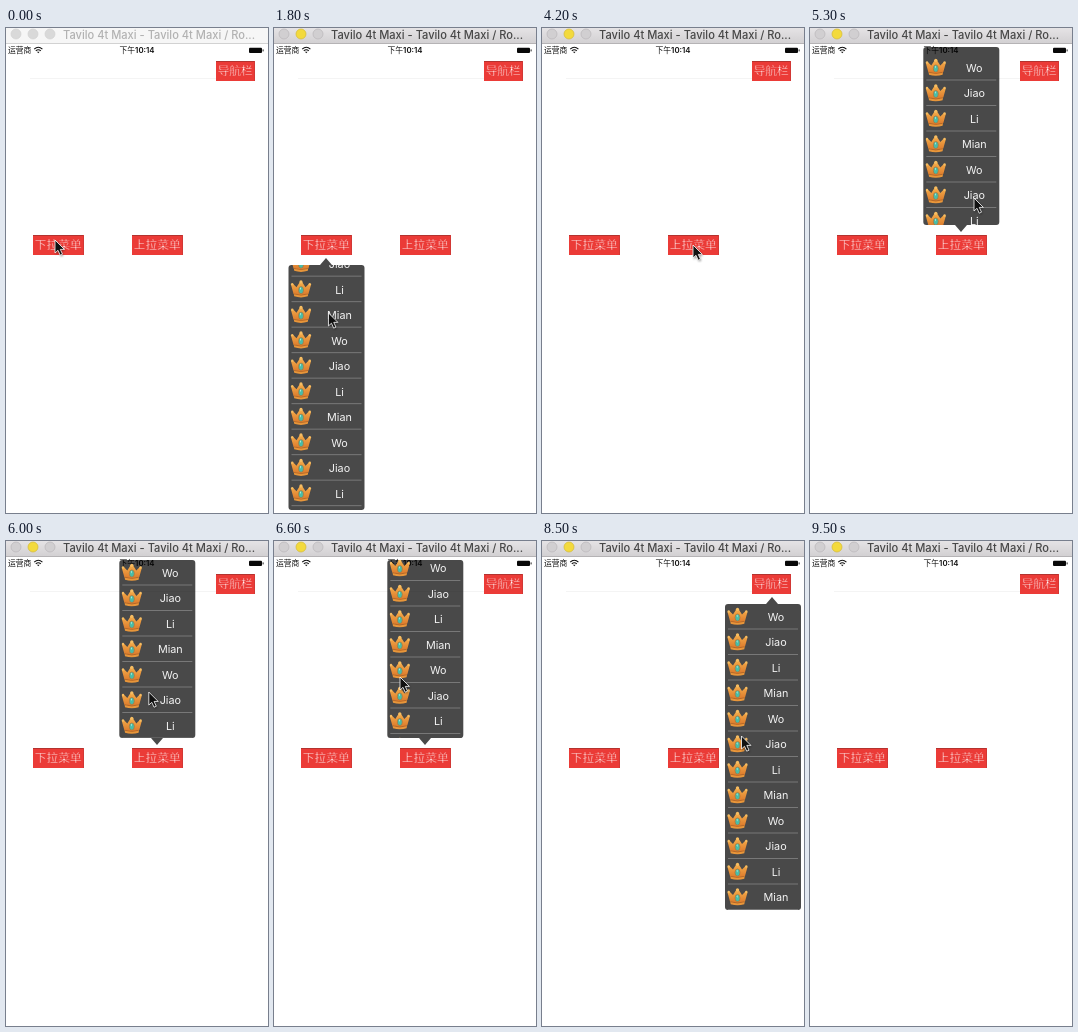
Recreate the animation shown at these times as an HTML page. Size 262 px wide and 485 px high, loop 10 s.

```html
<!DOCTYPE html>
<html lang="zh">
<head>
<meta charset="utf-8">
<title>弹出菜单</title>
<style>
html, body { margin: 0; width: 100%; height: 100%; overflow: hidden; background: #fff; }
svg { display: block; width: 262px; height: 485px; }
text { font-family: "Noto Sans CJK SC", "Noto Sans CJK", sans-serif; }
.latin { font-family: Inter, Roboto, sans-serif; }
/* The red stroke thins the glyphs to a light weight. */
.button { font-size: 11.7px; font-weight: 300; fill: #fff; stroke: #eb3b37; stroke-width: .35px; text-anchor: middle; }
.status { font-size: 7.8px; fill: #111; }
.row { font-size: 10.8px; fill: #f4f4f4; text-anchor: middle; }
</style>
</head>
<body>
<svg id="stage" viewBox="0 0 262 485" xmlns="http://www.w3.org/2000/svg">
  <defs>
    <linearGradient id="bar" x2="0" y2="1">
      <stop stop-color="#e5e3e5"/><stop offset="1" stop-color="#d2d0d2"/>
    </linearGradient>
    <linearGradient id="gold" x2="0" y2="1">
      <stop stop-color="#f5b04c"/><stop offset="1" stop-color="#dc7a2c"/>
    </linearGradient>
    <g id="crown">
      <path d="M0 4.5L2 3.5L5.5 7L9 1.5H11L14.5 7L18 3.5L20 4.5L17.5 13.5Q10 16 2.5 13.5Z" fill="url(#gold)"/>
      <path d="M2.7 13.2Q10 15.6 17.3 13.2L16.8 16.2Q10 18.4 3.2 16.2Z" fill="#e8963a"/>
      <path d="M3 13.8Q10 16.2 17 13.8" fill="none" stroke="#a85a20" stroke-width=".7"/>
      <g fill="#f6bd62"><circle cx="1.2" cy="4" r="1.2"/><circle cx="10" cy="1.8" r="1.6"/><circle cx="18.8" cy="4" r="1.2"/></g>
      <ellipse cx="10" cy="10" rx="2.5" ry="3.6" fill="#48bda9" stroke="#b9682a" stroke-width=".6"/>
      <path d="M9 8.2L10 7.2V10Z" fill="#c5f2e6"/>
    </g>
    <path id="arrow" d="M0 0V13L3 10.3L5.2 15.2L7.5 14.2L5.3 9.4H9.4Z"/>
    <filter id="blur"><feGaussianBlur stdDeviation=".9"/></filter>
    <g id="rows"></g>
  </defs>

  <rect width="262" height="485" fill="#fff"/>
  <rect id="titleBar" width="262" height="15.5"/>
  <path id="barEdge" d="M0 15.5H262"/>
  <g id="dots" stroke-width=".7"></g>
  <text id="title" class="latin" x="57" y="10.7" font-size="11.1" font-weight="500">Tavilo 4t Maxi - Tavilo 4t Maxi / Ro...</text>

  <text class="status" x="2" y="25">运营商</text>
  <g fill="none" stroke="#111" stroke-width="1.1">
    <path d="M28.2 21.1Q32.3 17.4 36.4 21.1M29.8 22.9Q32.3 20.7 34.8 22.9"/>
    <path d="M31 23.8H33.6L32.3 25.2Z" fill="#111" stroke="none"/>
  </g>
  <text class="status" x="131" y="25" text-anchor="middle">下午<tspan class="latin" font-weight="600">10:14</tspan></text>
  <rect x="243" y="19.8" width="13" height="5.2" rx="1" fill="#080808"/>
  <rect x="256.6" y="21.4" width="1" height="2" fill="#222"/>
  <path d="M24 50.5H210" stroke="#f4f4f4"/>
  <g id="buttons"></g>
  <g id="menus"></g>
  <g id="cursor">
    <use href="#arrow" x=".8" y="1.4" opacity=".45" filter="url(#blur)"/>
    <use href="#arrow" fill="#111" stroke="#fff" stroke-width=".8"/>
  </g>
</svg>
<script>
const NS = "http://www.w3.org/2000/svg";
const LOOP = 10000, STEP = 100, PITCH = 25.5, WIDTH = 76;
const $ = id => document.getElementById(id);

function add(parent, tag, attrs, text) {
  const el = document.createElementNS(NS, tag);
  for (const key in attrs) el.setAttribute(key, attrs[key]);
  if (text) el.textContent = text;
  parent.append(el);
  return el;
}

function addButton(x, y, label) {
  const w = label.length * 12 + 3, g = $("buttons");
  add(g, "rect", { x, y, width: w, height: 20, fill: "#eb3b37" });
  add(g, "path", { d: `M${x} ${y + .5}h${w}`, stroke: "#b3332f" });
  add(g, "path", { d: `M${x + w - .5} ${y}v20`, stroke: "#d23835" });
  add(g, "text", { class: "button", x: x + w / 2 - .3, y: y + 14.2 }, label);
}
addButton(210, 33, "导航栏");
addButton(27, 207, "下拉菜单");
addButton(126, 207, "上拉菜单");

const dots = [0, 1, 2].map(i => add($("dots"), "circle", { cx: 10 + 17 * i, cy: 6, r: 5 }));

const labels = ["Wo", "Jiao", "Li", "Mian"];
for (let i = 0; i < 12; i++) {
  const y = i * PITCH, g = $("rows");
  add(g, "use", { href: "#crown", x: 2.5, y: y + 3.5 });
  add(g, "text", { class: "row latin", x: 51, y: y + 16.9 }, labels[i % 4]);
  add(g, "path", { d: `M3 ${y + 25}H73`, stroke: "#858585", "stroke-width": .8 });
}

// A list swings by `swing` pixels between `from` and `to`.
const menus = [
  { x: 14.5, y: 237, h: 245, tip: 37.5, open: 900, close: 3400, swing: 72, from: 1100, to: 3100 },
  { x: 113.3, y: 19, h: 178, tip: 37.7, up: true, open: 4300, close: 7300, swing: -10.8, from: 4900, to: 7100 },
  { x: 183, y: 63, h: 12 * PITCH, tip: 47, open: 8100, close: 9000, swing: 0, from: 8100, to: 9000 }
];

menus.forEach((m, i) => {
  m.g = add($("menus"), "g", { transform: `translate(${m.x} ${m.y})` });
  const body = { width: WIDTH, height: m.h, rx: 3 };
  add(add(m.g, "clipPath", { id: "clip" + i }), "rect", body);
  const panel = add(m.g, "g", { opacity: .71 });
  add(panel, "rect", body);
  add(panel, "path", { d: `M${m.tip - 6} ${m.up ? m.h : 0}h12l-6 ${m.up ? 7 : -7}z` });
  m.list = add(add(m.g, "g", { "clip-path": `url(#clip${i})` }), "use", { href: "#rows" });
});

// Cursor moves: start, end, then the point reached.
const moves = [
  [0, 200, 126, 212], [200, 400, 54, 212], [1000, 2700, 55, 372], [2700, 3500, 152, 270],
  [3600, 4000, 151, 217], [4900, 5300, 164, 170], [5300, 6600, 126, 136],
  [7400, 7600, 212, 63], [7600, 7900, 229, 44], [8200, 8800, 170, 346], [9000, 9400, 140, 3]
];

const progress = (t, from, to) => Math.min(1, Math.max(0, (t - from) / (to - from)));
const ease = u => u * u * (3 - 2 * u);

function cursorAt(t) {
  let x = 49, y = 212;
  for (const [from, to, nextX, nextY] of moves) {
    const u = ease(progress(t, from, to));
    x += (nextX - x) * u;
    y += (nextY - y) * u;
  }
  return [x, y];
}

// One damped swing around the resting position.
function scrollAt(m, t) {
  const u = progress(t, m.from, m.to);
  return m.swing * Math.exp(-1.12 * u) * Math.sin(2 * Math.PI * u);
}

function show(el, on) { el.style.display = on ? "" : "none"; }

function paintWindow(active) {
  $("titleBar").setAttribute("fill", active ? "url(#bar)" : "#f6f6f6");
  $("barEdge").setAttribute("stroke", active ? "#b5b3b5" : "#d2d2d2");
  $("title").setAttribute("fill", active ? "#474747" : "#b2b2b2");
  dots.forEach((dot, i) => {
    const lit = active && i === 1;
    dot.setAttribute("fill", lit ? "#f3da3d" : active ? "#d1cfd1" : "#d9d9d9");
    dot.setAttribute("stroke", lit ? "#d5ba35" : active ? "#b9b7b9" : "#d2d2d2");
  });
}

function draw(time) {
  const t = Math.floor(time % LOOP / STEP) * STEP;
  paintWindow(t >= 800);
  for (const m of menus) {
    show(m.g, t >= m.open && t < m.close);
    m.list.setAttribute("y", -scrollAt(m, t));
  }
  show($("cursor"), t < 9500);
  $("cursor").setAttribute("transform", `translate(${cursorAt(t)})`);
}

const start = performance.now();
function tick() {
  draw(performance.now() - start);
  requestAnimationFrame(tick);
}
tick();
</script>
</body>
</html>
```
